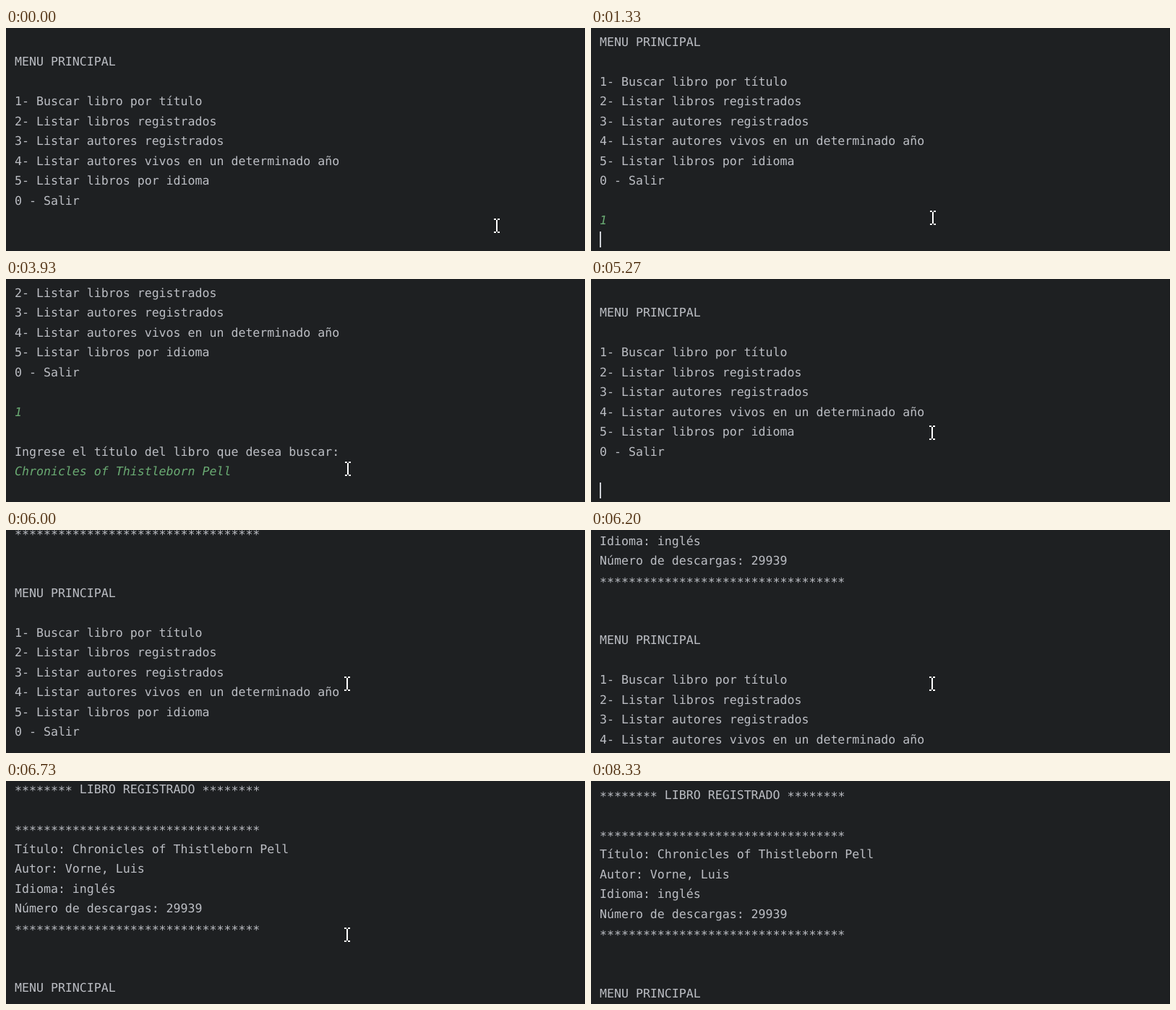
An HTML page for the animation above (9140 ms loop, 801 by 309 pixels).

```html
<!DOCTYPE html>
<html lang="es">
<head>
<meta charset="utf-8">
<title>Consola</title>
<style>
  html, body { margin: 0; width: 100%; height: 100%; overflow: hidden; background: #1e2022; }
  svg { display: block; }
  text {
    font: 16.58px "DejaVu Sans Mono", "Noto Sans Mono", monospace;
    fill: #bcbec4;
    white-space: pre;
    text-rendering: geometricPrecision;
  }
  .input { fill: #6aab73; font-style: italic; }
</style>
</head>
<body>
<svg width="801" height="309" viewBox="0 0 801 309">
  <g id="console"></g>
  <rect id="caret" width="2" height="22" fill="#ced0d6"/>
  <path id="mouse" fill="#fff" d="M-4-10h3v2h-3z M1-10h3v2h-3z M-1-8h2v16h-2z M-4 8h3v2h-3z M1 8h3v2h-3z"/>
  <rect x="800" width="1" height="309" fill="#191a1c"/>
</svg>
<script>
const LOOP = 9140, FPS = 15;
const LEFT = 12, BASE = 25, PITCH = 27.5, ADVANCE = 9.98, LAST_ROW = 10;
const CLICK = 200, FIRST_KEY = 600;

const book = 'Chronicles of Thistleborn Pell';
const stars = '*'.repeat(34);
const menu = `MENU PRINCIPAL

1- Buscar libro por título
2- Listar libros registrados
3- Listar autores registrados
4- Listar autores vivos en un determinado año
5- Listar libros por idioma
0 - Salir

`;
const result = `

******** LIBRO REGISTRADO ********

${stars}
Título: ${book}
Autor: Vorne, Luis
Idioma: inglés
Número de descargas: 29939
${stars}


`;

// What the console receives, and when.
const feed = [
  { time: 0, text: menu },
  { time: FIRST_KEY, text: '1', style: 'input' },
  { time: 1330, text: '\n' },
  { time: 1530, text: '\nIngrese el título del libro que desea buscar:\n' },
  { time: 2200, text: book, style: 'input' },
  { time: 2870, text: '\n' },
  { time: 5200, text: result },
  { time: 5270, text: menu }
];

// Straight or arched pointer moves, each from where the last one ended.
const home = { x: 679, y: 274 };
const moves = [
  { start: 0, end: 333, x: 473, y: 263, lift: 17 },
  { start: 4000, end: 4133, x: 463, y: 262, lift: 0 },
  { start: 4200, end: 4467, x: 472, y: 213, lift: 0 },
  { start: 8000, end: 8333, x: 168, y: 319, lift: 0 }
];
const wheel = { start: 5884, end: 6800, distance: 9 * PITCH, power: 1.322 };

const board = document.getElementById('console');
const caret = document.getElementById('caret');
const mouse = document.getElementById('mouse');
const svg = (name, parent) =>
  parent.appendChild(document.createElementNS('http://www.w3.org/2000/svg', name));
const progress = (t, { start, end }) => Math.min(1, Math.max(0, (t - start) / (end - start)));

// Asterisks sit lower, at mid height of the capitals.
function addRow(content, style) {
  const row = svg('text', board);
  row.setAttribute('x', LEFT);
  if (style) row.setAttribute('class', style);
  let shift = 0;
  for (const part of content.split(/(\*+)/).filter(Boolean)) {
    const span = svg('tspan', row), want = part[0] === '*' ? 2 : 0;
    span.setAttribute('dy', want - shift);
    span.textContent = part;
    shift = want;
  }
  return row;
}

const rows = [];
let line = 0;
for (const entry of feed) {
  const parts = entry.text.split('\n');
  parts.forEach((part, i) => {
    if (part) rows.push({ node: addRow(part, entry.style), line: line + i, time: entry.time });
  });
  line += parts.length - 1;
  entry.line = line;
  entry.col = parts[parts.length - 1].length;
}

function pointer(t) {
  let { x, y } = home;
  for (const move of moves) {
    const p = progress(t, move);
    x += (move.x - x) * p;
    y += (move.y - y) * p - move.lift * Math.sin(Math.PI * p);
  }
  return [Math.round(x), Math.round(y)];
}

function wheelOffset(t) {
  const eased = 1 - (1 - progress(t, wheel)) ** wheel.power;
  return Math.round(eased * wheel.distance * 2) / 2;
}

// Steady for a while after activity, then blinking.
function caretOn(t, idle) {
  if (t < FIRST_KEY) return t >= CLICK;
  return idle < 1060 || Math.floor((idle - 1060) / 500) % 2 === 1;
}

function draw(t) {
  const q = Math.floor((t + 5) * FPS / 1000) * 1000 / FPS;
  const last = feed.filter(entry => entry.time <= t).pop();
  const scroll = (last.line - LAST_ROW) * PITCH - wheelOffset(q);
  const baseline = n => Math.floor(BASE + n * PITCH - scroll + 0.2);

  for (const row of rows) {
    const y = baseline(row.line);
    row.node.setAttribute('y', y);
    row.node.style.display = row.time <= t && y > 0 && y < 330 ? '' : 'none';
  }

  // The click puts the caret one line above the prompt until a key is typed.
  const caretLine = t < FIRST_KEY ? last.line - 1 : last.line;
  caret.style.display = caretOn(t, t - last.time) ? '' : 'none';
  caret.setAttribute('x', Math.floor(LEFT + last.col * ADVANCE));
  caret.setAttribute('y', baseline(caretLine) - 18);
  mouse.setAttribute('transform', `translate(${pointer(q)})`);
}

const start = performance.now();
function tick() {
  draw((performance.now() - start) % LOOP);
  requestAnimationFrame(tick);
}
tick();
</script>
</body>
</html>
```
